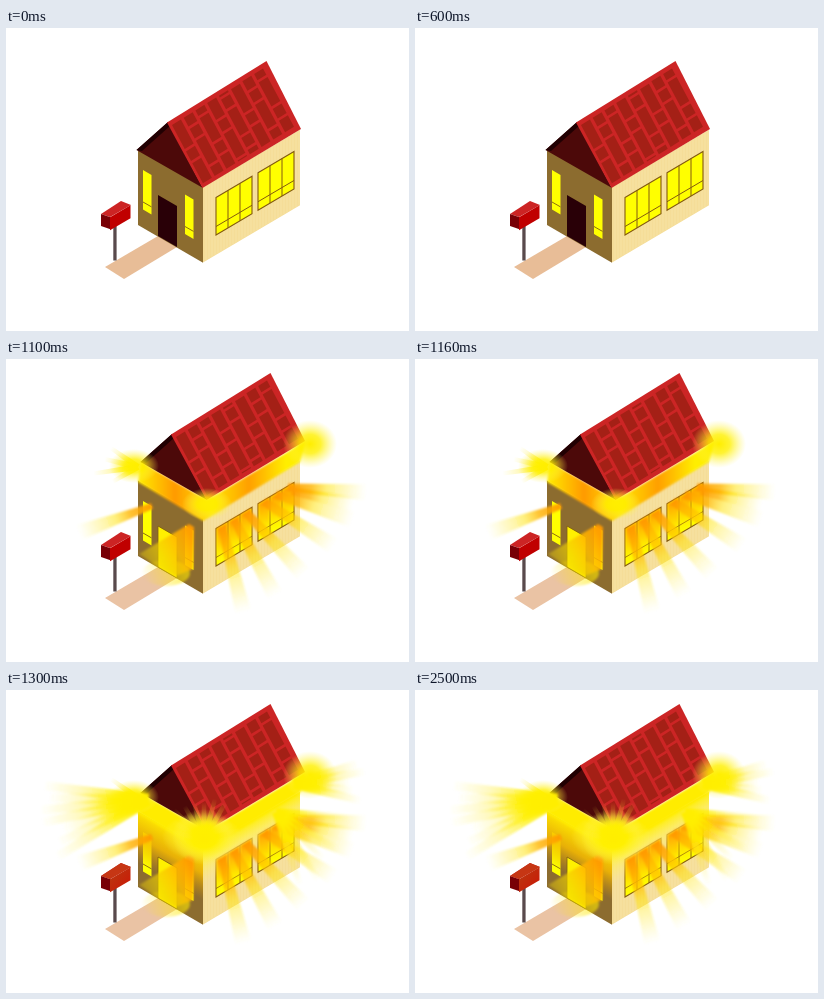
These frames come from a looping animation (403x303 px, 3300 ms). An HTML page:

```html
<!DOCTYPE html>
<html lang="en">
<head>
<meta charset="utf-8">
<title>House of light</title>
<style>
html, body { margin: 0; width: 100%; height: 100%; overflow: hidden; background: #fff; }
svg { display: block; width: 100vw; height: 100vh; }
</style>
</head>
<body>
<svg id="stage" viewBox="0 0 403 303">
  <defs>
    <filter id="soft" x="-30%" y="-30%" width="160%" height="160%"><feGaussianBlur stdDeviation="1"/></filter>
    <radialGradient id="glow">
      <stop offset="0" stop-color="#ffee00"/>
      <stop offset=".4" stop-color="#fff000" stop-opacity=".8"/>
      <stop offset="1" stop-color="#fff460" stop-opacity="0"/>
    </radialGradient>
    <radialGradient id="shade">
      <stop offset="0" stop-color="#2e1c00" stop-opacity=".75"/>
      <stop offset="1" stop-color="#2e1c00" stop-opacity="0"/>
    </radialGradient>
  </defs>
</svg>
<script>
const NS = 'http://www.w3.org/2000/svg';
const svg = document.getElementById('stage');
const defs = svg.querySelector('defs');
const LEFT = 0.58;    // slope of the front wall
const RIGHT = -0.59;  // slope of the side wall
const AMBER = [[0, '#ff9800', .95], [.3, '#ffb400', .8], [.5, '#ffe100', .5], [1, '#fff050', 0]];
const GOLD = [[0, '#ffee00', 1], [.35, '#fff000', .7], [.65, '#ffec30', .3], [1, '#fff040', 0]];
const layers = [];
let ids = 0;

let seed = 7;
const random = () => (seed = seed * 16807 % 2147483647) / 2147483647;

function add(parent, tag, attrs) {
  const node = document.createElementNS(NS, tag);
  for (const key in attrs) node.setAttribute(key, attrs[key]);
  parent.appendChild(node);
  return node;
}

// A group that is visible only from one stage to another.
function layer(from, to = 4, attrs = {}) {
  const node = add(svg, 'g', attrs);
  layers.push({ node, from, to });
  return node;
}

const poly = (g, points, fill, more = {}) => add(g, 'polygon', { points, fill, ...more });

const line = (g, d, stroke, width = 1) =>
  add(g, 'path', { d, stroke, 'stroke-width': width, fill: 'none' });

// Upright panel on a sloping wall.
const panel = (g, x, y, w, h, slope, fill, more) =>
  poly(g, `${x},${y} ${x + w},${y + w * slope} ${x + w},${y + w * slope + h} ${x},${y + h}`, fill, more);

const blob = (g, cx, cy, rx, ry = rx, fill = 'url(#glow)') =>
  add(g, 'ellipse', { cx, cy, rx, ry, fill });

function fade(x1, y1, x2, y2, stops) {
  const id = 'fade' + ids++;
  const grad = add(defs, 'linearGradient', { id, gradientUnits: 'userSpaceOnUse', x1, y1, x2, y2 });
  for (const [offset, color, opacity] of stops) {
    add(grad, 'stop', { offset, 'stop-color': color, 'stop-opacity': opacity });
  }
  return `url(#${id})`;
}

// Wedge of light: half width w0 at the start, w1 at the end.
function ray(g, x, y, degrees, length, w0, w1, stops) {
  const a = degrees * Math.PI / 180;
  const c = Math.cos(a), s = Math.sin(a);
  const ex = x + c * length, ey = y + s * length;
  const at = (px, py, w) => `${px - s * w},${py + c * w}`;
  poly(g, [at(x, y, w0), at(x, y, -w0), at(ex, ey, -w1), at(ex, ey, w1)].join(' '),
    fade(x, y, ex, ey, stops));
}

function fan(g, x, y, from, to, count, length, width, stops = GOLD) {
  for (let i = 0; i < count; i++) {
    const angle = from + (to - from) * i / (count - 1);
    ray(g, x, y, angle, length * (.7 + .4 * random()), width, width * .7, stops);
  }
}

// Walls, path and door
const house = add(svg, 'g', {});
const path = poly(house, '99,239 152,208 171,219 118,251', '#e8bd97');
panel(house, 132, 121.5, 65, 75.5, LEFT, '#8c6c2f');
panel(house, 197, 159, 97, 75.5, RIGHT, '#f5dd98');
for (let x = 200; x < 294; x += 3) {
  line(house, `M${x} ${159 + (x - 197) * RIGHT}v75`, '#f9e6aa', .7);
}
panel(house, 152, 167, 19, 41, LEFT, '#290007');

// Front windows
for (const [x, y] of [[137, 142], [179, 166.5]]) {
  panel(house, x, y, 8.5, 39.5, LEFT, '#ffff00');
  line(house, `M${x} ${y + 32}l8.5 4.9`, '#8c6c10');
}

// Side windows
const PANE = 12;
const panes = [];
for (const x of [210, 252]) {
  const y = 169.5 + (x - 210) * RIGHT;
  panel(house, x, y, 3 * PANE, 37.5, RIGHT, '#ffff00', { stroke: '#835a10', 'stroke-width': 1.1 });
  line(house, `M${x} ${y + 29}l${3 * PANE} ${3 * PANE * RIGHT}`, '#835a10');
  for (let i = 0; i < 3; i++) {
    const px = x + i * PANE, py = y + i * PANE * RIGHT;
    panes.push([px, py]);
    if (i) line(house, `M${px} ${py}v37.5`, '#835a10');
  }
}

// Light running down the walls
const wash = layer(3);
panel(wash, 132, 121.5, 65, 75.5, LEFT,
  fade(164, 138, 141, 178, [[0, '#ffe800', 1], [.5, '#f8bc00', .85], [1, '#e0a000', 0]]));
panel(wash, 197, 159, 97, 75.5, RIGHT,
  fade(245, 130, 261, 157, [[0, '#ffee00', 1], [.4, '#fff050', .75], [1, '#fff080', 0]]));

panel(layer(2), 152, 167, 19, 41, LEFT, '#fff000', { stroke: '#806010', 'stroke-width': .8 });

// Window light, turning from downward to sideways
const rays = layer(1, 4, { filter: 'url(#soft)' });
panes.forEach(([x, y], i) => {
  panel(rays, x + .5, y, PANE - 1, 36, RIGHT,
    fade(x, y, x + 8, y + 34, [[0, '#ff9c00', .95], [.5, '#ffc400', .7], [1, '#fff000', .1]]));
  ray(rays, x + 6, y - 2, 76 - 14.5 * i, 88 - 2 * i, 4, 8, AMBER);
});
ray(rays, 286, 132, 12, 62, 4, 7, AMBER);
ray(rays, 146, 147, 160, 78, 3, 8, AMBER);
blob(rays, 160, 214, 24, 13, fade(175, 206, 138, 222, [[0, '#ffe800', .6], [1, '#ffe800', 0]]));
poly(rays, '183,165 188,168 187,210 170,217 152,208 133,195',
  fade(186, 178, 139, 203, [[0, '#ff9a00', .95], [.35, '#ffbd00', .85], [.7, '#f0d400', .6], [1, '#ffe500', .3]]));
blob(layer(1, 1), 160, 196, 10, 20, 'url(#shade)');

// Mailbox
const box = add(svg, 'g', {});
panel(box, 107.3, 198, 3.3, 34.5, 0, '#594a4c');
poly(box, '95,186 115,173 125,177 104,189', '#cc2424');
panel(box, 95, 186, 9.5, 12, .35, '#780006');
const side = panel(box, 104, 189.3, 20.5, 13, RIGHT, '#c00000');
const lid = poly(layer(4), '95,186 115,173 125,177 104,189', '#c63614');
const hot = fade(104, 180, 125, 198, [[0, '#b83a10', 1], [1, '#cc1806', 1]]);

// Light behind the lifted roof
const GAP = '135,103 201,141 300,82 294,103 197,162 132,123';
const soft = { filter: 'url(#soft)' };
const bands = ['#ffec00', '#ff9a00', '#ffe600', '#ff9f00', '#ffee00'];
poly(layer(2, 2), GAP, fade(132, 0, 300, 0, bands.map((color, i) => [i * .22, color, 1])), soft);
poly(layer(3), GAP, '#ffec00', soft);

// Roof
const roof = add(svg, 'g', {});
poly(roof, '130.5,122 162,94 197,160', '#4c0909');
poly(roof, '130.5,122 162,94 164,98 136,123', '#210002');
poly(roof, '161,94.5 260.5,33 295,101 196.5,160', '#cc2525');
const tiles = add(roof, 'g', { transform: 'matrix(.99 -.615 .35 .66 161 95)' });
for (let c = 0; c < 8; c++) {
  let y = 4 - c * 23 % 58;
  for (let r = 0; r < 6; r++) {
    const size = r % 2 ? 18 : 40;
    const top = Math.max(y, 4) + 1.8, end = Math.min(y + size, 96) - 1.8;
    if (end > top) {
      add(tiles, 'rect', { x: 3 + c * 11.85, y: top, width: 9, height: end - top, fill: '#a42016' });
    }
    y += size;
  }
}

// Glow at the corners of the eaves
const glow = layer(2);
blob(glow, 128, 107, 25, 17);
blob(glow, 201, 145, 25, 16);
blob(glow, 304, 85, 27, 24);
fan(glow, 132, 108, 150, 215, 4, 42, 3);

const flare = layer(3, 4, soft);
fan(flare, 142, 110, 148, 188, 7, 108, 6);
fan(flare, 288, 94, -18, 14, 5, 70, 5);
fan(flare, 270, 122, 4, 72, 6, 75, 4);
blob(flare, 196, 147, 40, 24);

const burst = layer(4);
blob(burst, 198, 147, 32, 28);
fan(burst, 198, 150, 195, 345, 11, 40, 3);

function draw(time) {
  const t = time % 3300;
  const stage = t < 1000 ? 0 : Math.min(4, 1 + Math.floor((t - 1000) / 100));
  for (const { node, from, to } of layers) {
    node.setAttribute('display', stage >= from && stage <= to ? 'inline' : 'none');
  }
  roof.setAttribute('transform', stage > 1 ? 'translate(4 -19)' : '');
  path.setAttribute('fill', stage ? '#eac3a4' : '#e8bd97');
  side.setAttribute('fill', stage === 4 ? hot : '#c00000');
}

const start = performance.now();
function tick() {
  draw(performance.now() - start);
  requestAnimationFrame(tick);
}
tick();
</script>
</body>
</html>
```
